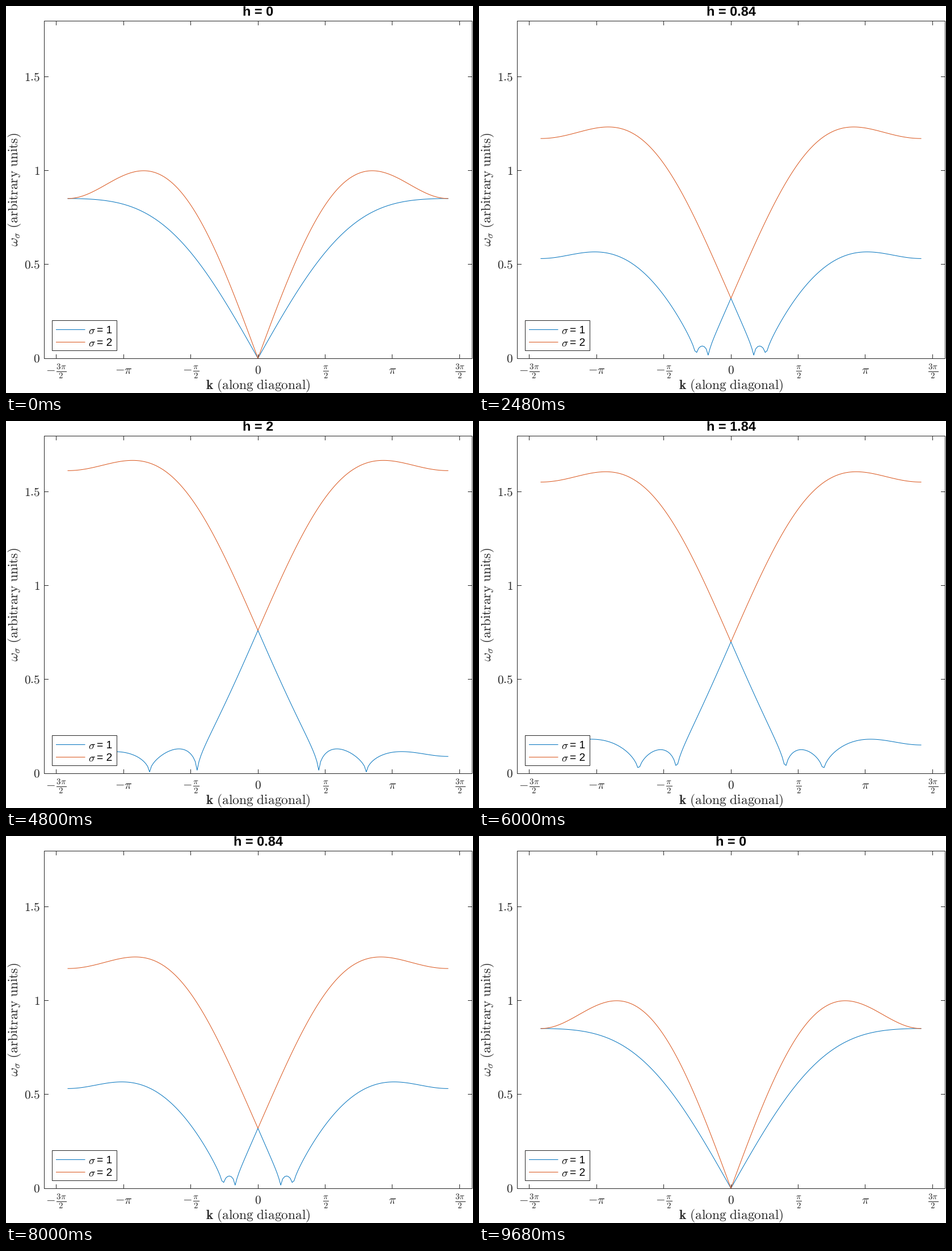
Recreate the animation shown at these times as a matplotlib script. Size 823 by 681 pixels, loop 9.76 s.

```python
import numpy as np
import matplotlib as mpl
import matplotlib.pyplot as plt
from matplotlib.animation import FuncAnimation
from matplotlib.patches import Rectangle

W, H, DPI = 823, 681, 64
PT = 72 / DPI  # points per pixel
LEFT, RIGHT, TOP, BOTTOM = 67.5, 821.5, 26.5, 620.5  # axes frame
X0, Y0, XUNIT, YUNIT = 444, 619.9, 75.4, 330  # data origin and scale
INK, BLUE, ORANGE = "#262626", "#0072BD", "#D95319"

RAMP, HOLD, STEP = 50, 10, 0.04
FRAMES = 122

mpl.rcParams["mathtext.fontset"] = "cm"
mpl.rcParams["text.hinting"] = "no_hinting"
mpl.rcParams["path.simplify"] = False

fig = plt.figure(figsize=(W / DPI, H / DPI), dpi=DPI, facecolor="white")
ax = fig.add_axes([0, 0, 1, 1])
ax.set_xlim(0, W)
ax.set_ylim(H, 0)
ax.axis("off")


def line(xs, ys, color=INK, z=2, cap="butt"):
    return ax.plot(xs, ys, color=color, lw=PT, zorder=z, snap=False,
                   solid_capstyle=cap)[0]


def label(x, y, s, size, ha="center", color=INK, **kw):
    return ax.text(x, y, s, fontsize=size * PT, ha=ha, va="baseline",
                   color=color, zorder=6, **kw)


def box(x0, y0, x1, y1, z):
    ax.add_patch(Rectangle((x0, y0), x1 - x0, y1 - y0, facecolor="white",
                           edgecolor=INK, lw=PT, zorder=z, snap=False))


def crisp(v):
    return np.floor(v) + 0.5


# Axes frame, ticks and labels
box(LEFT, TOP, RIGHT, BOTTOM, 1)
TICK, FONT, BIG = 7.5, 21.33, 23.47

half = r"\hspace{0.12}\frac{%s\pi}{2}"
x_names = ["-" + half % "3", r"-\pi", "-" + half % "", "0",
           half % "", r"\pi", half % "3"]
for n, name in enumerate(x_names, -3):
    x = X0 + n * np.pi / 2 * XUNIT
    for edge, d in ((BOTTOM, -TICK), (TOP, TICK)):
        line([crisp(x)] * 2, [edge, edge + d])
    label(x, 647, f"${name}$", FONT)

for v in (0, 0.5, 1, 1.5):
    y = Y0 - v * YUNIT
    if v:
        for edge, d in ((LEFT, TICK), (RIGHT, -TICK)):
            line([edge, edge + d], [crisp(y)] * 2)
    label(60, y + 7, f"${v:g}$", FONT, ha="right")

label(X0, 674, r"$\mathbf{k}\ \mathrm{(along\ diagonal)}$", BIG)
label(21, 323.5, r"$\omega_\sigma\ \mathrm{(arbitrary\ units)}$", BIG,
      rotation=90, rotation_mode="anchor")
title = label(X0, 17, "", BIG, color="black", family="Liberation Sans",
              weight="bold")

# Legend
box(81.5, 553.5, 195.5, 606.5, 4)
for n, (y, color) in enumerate(((569.5, BLUE), (591.5, ORANGE)), 1):
    line([88, 139.5], [y, y], color, 5)
    label(145, y + 7, r"$\sigma$", 19.2, ha="left", color="black")
    label(160.5, y + 7, f"= {n}", 19.2, ha="left", color="black",
          family="Liberation Sans")

# Square lattice along the diagonal: squared transverse and longitudinal modes
q = np.linspace(-np.pi, np.pi, 201)
NORM = 6.89
soft = (2.5 * (1 - np.cos(q)) + np.sin(q) ** 2) / NORM
hard = (2.5 * (1 - np.cos(q)) + 4 * np.sin(q) ** 2) / NORM
xs = X0 + q * np.sqrt(2) * XUNIT
lower = line(xs, xs, BLUE, 3, "projecting")
upper = line(xs, xs, ORANGE, 3, "projecting")


def modes(h):
    """Both branches with the field coupling; unstable ones as |omega|."""
    w2 = h * h / NORM
    total = soft + hard + 2 * w2
    root = np.sqrt(total ** 2 - 4 * (soft - w2) * (hard - w2))
    return [np.sqrt(np.abs(total + s * root) / 2) for s in (-1, 1)]


def field(i):
    up = min(max(i - HOLD, 0), RAMP)
    down = max(i - (FRAMES - 1 - RAMP), 0)
    return round(STEP * (up - down), 2)


def update(i):
    h = field(i)
    title.set_text(f"h = {h:g}")
    for curve, w in zip((lower, upper), modes(h)):
        curve.set_ydata(Y0 - w * YUNIT)
    return lower, upper, title


anim = FuncAnimation(fig, update, frames=FRAMES, interval=80, repeat=True,
                     repeat_delay=0, init_func=lambda: update(0))
plt.show()
```
